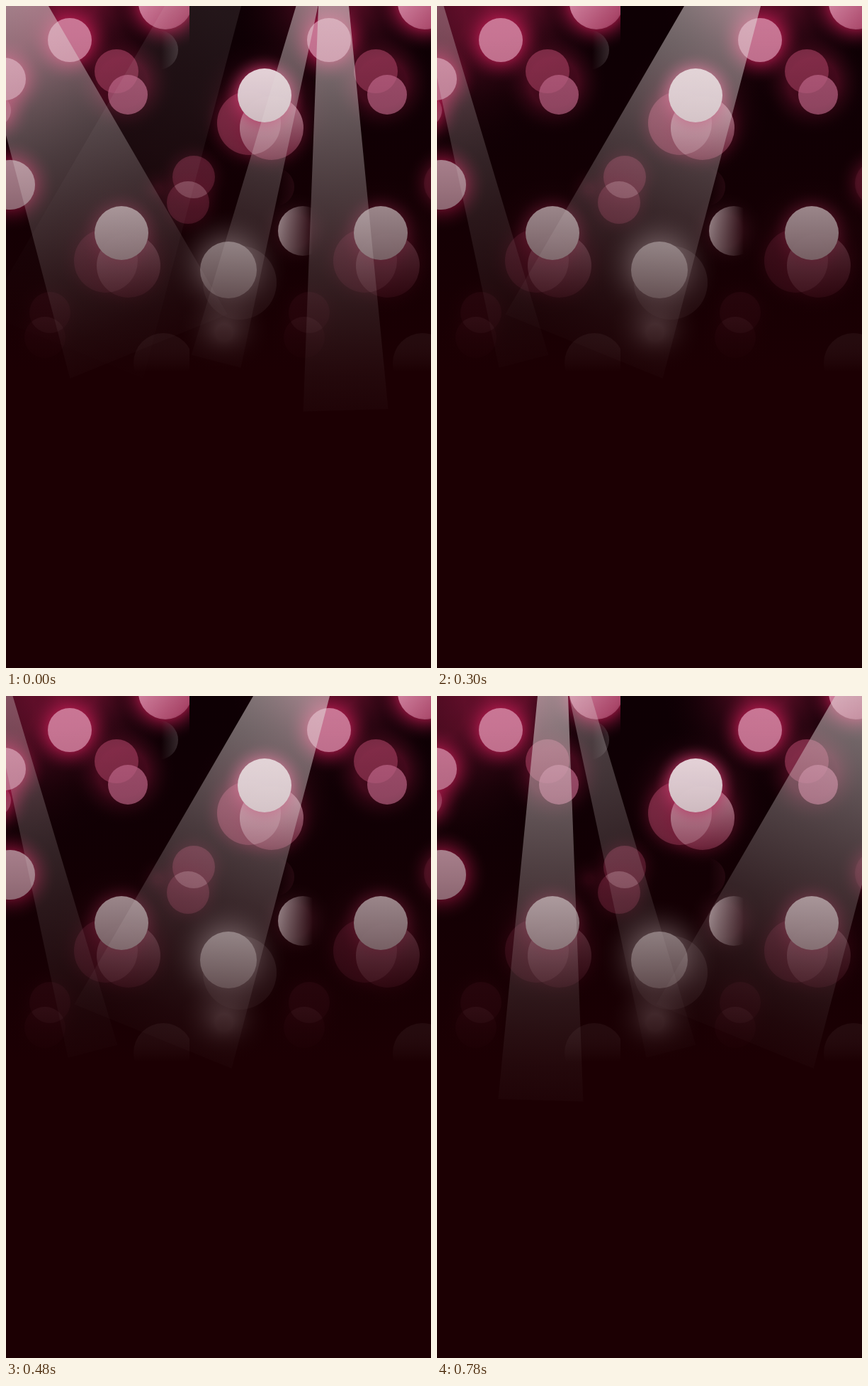
Recreate the animation shown at these times as an HTML page with a canvas. Size 600x933 px, loop 900 ms.

```html
<!DOCTYPE html>
<html lang="en">
<head>
<meta charset="utf-8">
<title>Stage lights</title>
<style>
html, body { margin: 0; width: 100%; height: 100%; overflow: hidden; background: #1c0003; }
canvas { display: block; }
</style>
</head>
<body>
<canvas id="stage" width="600" height="933"></canvas>
<script>
const W = 600, H = 933, HOLD = 300;
const TILE = 366, SEAM = 259, HORIZON = 515;
const BASE = '28,0,3', CRIMSON = '150,24,66', ROSE = '185,75,112',
      PINK = '212,138,166', PALE = '246,232,237', BEAM = '225,215,215';

const stage = document.getElementById('stage');
const ctx = stage.getContext('2d');
const backdrop = document.createElement('canvas');
backdrop.width = W;
backdrop.height = H;
const bg = backdrop.getContext('2d');

const rgba = (color, a) => `rgba(${color},${a})`;

// Fill a gradient with alpha(p), p running from 0 to 1
function ramp(g, color, alpha, steps = 12) {
  for (let i = 0; i <= steps; i++) g.addColorStop(i / steps, rgba(color, alpha(i / steps)));
  return g;
}

function circle(x, y, r) {
  bg.beginPath();
  bg.arc(x, y, r, 0, Math.PI * 2);
}

function disc(x, y, r, color, a) {
  bg.fillStyle = rgba(color, a);
  circle(x, y, r);
  bg.fill();
}

// Halo that starts at the rim of a disc and fades over `spread`
function glow(x, y, r, spread, color, a) {
  const end = r + spread;
  bg.fillStyle = ramp(bg.createRadialGradient(x, y, r, x, y, end), color, p => a * (1 - p) ** 2);
  bg.fillRect(x - end, y - end, end * 2, end * 2);
}

// Disc whose alpha runs from a to b along the given angle
function shaded(x, y, r, color, angle, a, b, reach = r) {
  const dx = Math.cos(angle), dy = Math.sin(angle);
  const g = bg.createLinearGradient(x - dx * r, y - dy * r, x + dx * reach, y + dy * reach);
  bg.fillStyle = ramp(g, color, p => a + (b - a) * p);
  circle(x, y, r);
  bg.fill();
}

function clipped(shape, paint) {
  bg.save();
  shape();
  bg.clip();
  paint();
  bg.restore();
}

// Two overlapping discs with a lighter lens between them
function pair(x1, y1, x2, y2, r, a, shine) {
  for (const [x, y] of [[x1, y1], [x2, y2]]) {
    glow(x, y, r - 5, 28, CRIMSON, a * 0.7);
    disc(x, y, r, ROSE, a);
  }
  clipped(() => circle(x1, y1, r), () => disc(x2, y2, r, PALE, shine));
}

function cluster(x, y, strength) {
  glow(x, y + 20, 44, 60, CRIMSON, 0.3 * strength);
  pair(x - 22, y + 39, x + 10, y + 46, 45, 0.55 * strength, 0.25 * strength);
  shaded(x + 10, y + 46, 45, PALE, Math.PI / 2, 0.55 * strength, 0);
  glow(x, y, 36, 26, '215,60,115', 0.6 * strength);
  disc(x, y, 38, PALE, 0.97);
}

function pinkDisc(x, y, r, a = 0.84) {
  glow(x, y, r - 2, 34, '180,26,78', 0.75);
  disc(x, y, r, PINK, a);
}

function tile(dx) {
  glow(100 + dx, -10, 30, 120, CRIMSON, 0.5);
  pinkDisc(90 + dx, 48, 31);

  clipped(() => { bg.beginPath(); bg.rect(dx, 0, SEAM, HORIZON); }, () => {
    glow(225 + dx, -5, 35, 36, '180,26,78', 0.75);
    shaded(225 + dx, -5, 38, PINK, 0.7, 1, 0.4);
    shaded(222 + dx, 503, 42, PALE, Math.PI / 2, 0.3, 0.9);
  });

  glow(165 + dx, 108, 35, 40, CRIMSON, 0.4);
  disc(156 + dx, 92, 31, ROSE, 0.55);
  disc(172 + dx, 125, 28, '200,108,145', 0.72);
  cluster(163 + dx, 320, 0.55);
  pair(62 + dx, 432, 55 + dx, 467, 29, 0.2, 0.15);
}

function paintBackdrop() {
  bg.fillStyle = '#0e0004';
  bg.fillRect(0, 0, W, H);
  glow(0, 20, 40, 170, CRIMSON, 0.45);
  tile(0);
  tile(TILE);

  // Discs cut by the sides
  pinkDisc(-16, 147, 23, 0.5);
  pinkDisc(-2, 103, 30);
  pinkDisc(6, 252, 35, 0.6);
  disc(6, 252, 35, PALE, 0.6);
  glow(622, 250, 28, 30, CRIMSON, 0.5);
  disc(622, 250, 32, ROSE, 0.2);

  // Faint crescents
  shaded(215, 62, 28, '130,120,124', Math.PI, 0.34, 0, -4);
  shaded(380, 255, 27, ROSE, Math.PI, 0.16, 0, -4);

  cluster(365, 126, 1);
  pair(265, 241, 257, 277, 30, 0.42, 0.28);
  glow(215, 258, 5, 30, CRIMSON, 0.25);

  // Large pale disc and the haze below it
  glow(314, 372, 36, 50, PALE, 0.5);
  glow(308, 460, 12, 55, PALE, 0.8);
  disc(330, 390, 52, PALE, 0.2);
  disc(314, 372, 40, '255,252,253', 0.94);

  glow(408, 317, 22, 34, ROSE, 0.25);
  shaded(419, 317, 35, PALE, 0, 1, 0, 14);

  const fade = bg.createLinearGradient(0, 0, 0, HORIZON);
  bg.fillStyle = ramp(fade, BASE, p => p ** 1.5);
  bg.fillRect(0, 0, W, H);
}

// Half widths at top and foot, lean in radians, length along the axis
const WIDE = { top: 54, foot: 120, lean: 0.387, length: 518 };
const TALL = { top: 21.5, foot: 60, lean: 0.03, length: 570 };
const THIN = { top: 15.5, foot: 36, lean: 0.251, length: 517 };

function beam({ top, foot, lean, length }, x, dir, power) {
  const ux = Math.sin(lean * dir), uy = Math.cos(lean);
  const fx = x + ux * length, fy = uy * length;
  const g = ctx.createLinearGradient(x, 0, fx, fy);
  ctx.fillStyle = ramp(g, BEAM, p => power * (0.03 + 0.97 * (1 - p) ** 1.35));
  ctx.beginPath();
  ctx.moveTo(x - top, 0);
  ctx.lineTo(x + top, 0);
  ctx.lineTo(fx + uy * foot, fy - ux * foot);
  ctx.lineTo(fx - uy * foot, fy + ux * foot);
  ctx.fill();
}

const scenes = [
  () => {
    beam(WIDE, 6, 1, 0.56);
    beam(WIDE, 278, -1, 0.1);
    beam(THIN, 425, -1, 0.5);
    beam(TALL, 462.5, 1, 0.6);
  },
  () => {
    beam(THIN, -6, 1, 0.34);
    beam(WIDE, 403, -1, 0.56);
  },
  () => {
    beam(TALL, 163.5, -1, 0.6);
    beam(THIN, 202, 1, 0.34);
    beam(WIDE, 616, -1, 0.56);
  }
];

function draw(t) {
  ctx.drawImage(backdrop, 0, 0);
  scenes[Math.floor(t / HOLD) % scenes.length]();
}

paintBackdrop();
const start = performance.now();
function tick() {
  draw(Math.max(0, performance.now() - start));
  requestAnimationFrame(tick);
}
tick();
</script>
</body>
</html>
```
